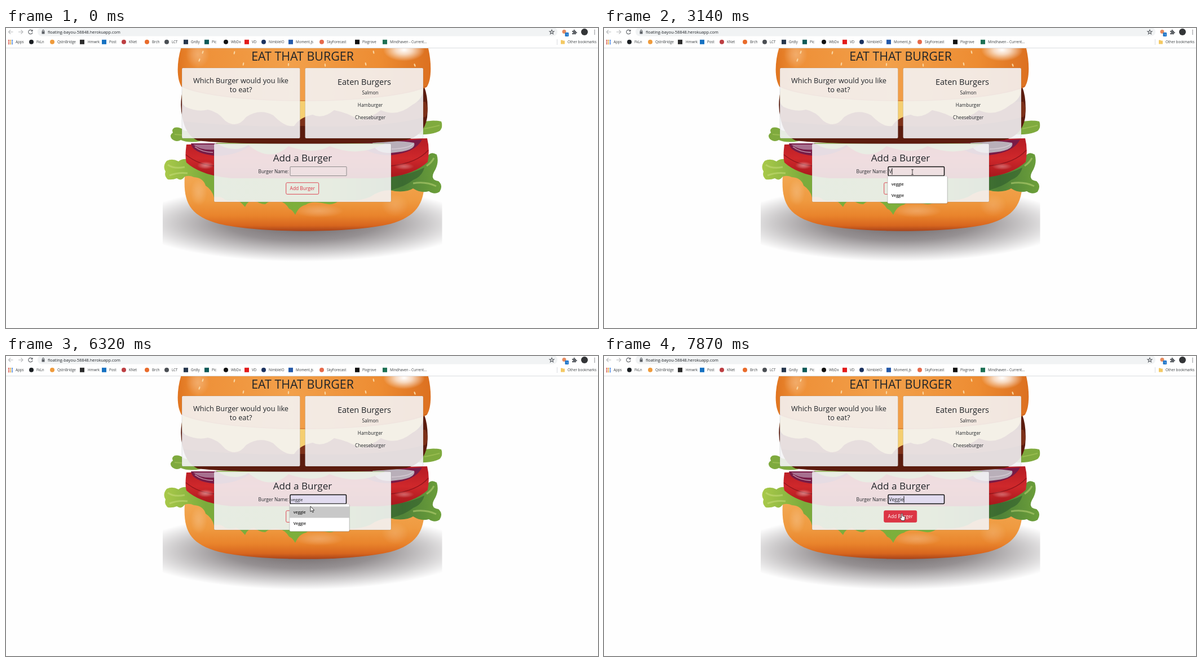
Recreate the animation shown at these times as an HTML page. Size 1050 by 533 pixels, loop 8 s.

```html
<!DOCTYPE html>
<html lang="en">
<head>
<meta charset="utf-8">
<title>Eat That Burger</title>
<style>
html, body { margin: 0; width: 100%; height: 100%; overflow: hidden; background: #fefefe; }
svg { display: block; width: 1050px; height: 533px; font-family: 'Open Sans', 'Noto Sans', sans-serif; }
text { fill: #212529; white-space: pre; }
.head { font-weight: 500; text-anchor: middle; }
.body { font-size: 8.25px; }
.mid { text-anchor: middle; }
.mark { font-size: 6.25px; fill: #3c4043; }
.item { font-size: 7.1px; font-weight: 600; fill: #222; }
.panel { fill: #f4f4f7; fill-opacity: .89; stroke: #000; stroke-opacity: .1; }
.icon { fill: none; stroke: #5f6368; stroke-width: 1.1; }
.cursor { fill: #fff; stroke: #111; stroke-width: .8; stroke-linejoin: round; }
</style>
</head>
<body>
<svg viewBox="0 0 1050 533">
<defs>
  <clipPath id="page"><path d="M278 36H773.5V533H278z"/></clipPath>
  <radialGradient id="shade">
    <stop offset="0" stop-color="#6b6466"/><stop offset=".45" stop-color="#959092"/>
    <stop offset=".75" stop-color="#cdcbcc"/><stop offset="1" stop-color="#fefefe"/>
  </radialGradient>
  <radialGradient id="glow">
    <stop offset="0" stop-color="#fff"/><stop offset=".4" stop-color="#fff" stop-opacity=".7"/>
    <stop offset="1" stop-color="#fff" stop-opacity="0"/>
  </radialGradient>
  <linearGradient id="crown">
    <stop offset="0" stop-color="#e0741f"/><stop offset=".08" stop-color="#ee9038"/>
    <stop offset=".45" stop-color="#f2a04a"/><stop offset=".8" stop-color="#ed8c32"/>
    <stop offset="1" stop-color="#dc7020"/>
  </linearGradient>
  <linearGradient id="heel" x2="0" y2="1">
    <stop offset="0" stop-color="#f2a752"/><stop offset=".45" stop-color="#ef9a40"/>
    <stop offset=".72" stop-color="#e9842c"/><stop offset=".9" stop-color="#d8661e"/>
    <stop offset="1" stop-color="#a8431a"/>
  </linearGradient>
  <linearGradient id="red" x2="0" y2="1">
    <stop offset="0" stop-color="#b51b24"/><stop offset=".5" stop-color="#cf282b"/>
    <stop offset="1" stop-color="#a5171c"/>
  </linearGradient>
  <linearGradient id="leaf">
    <stop offset="0" stop-color="#a9c94a"/><stop offset=".15" stop-color="#7bab3c"/>
    <stop offset=".6" stop-color="#7db03b"/><stop offset=".86" stop-color="#4f8238"/>
    <stop offset="1" stop-color="#6da03a"/>
  </linearGradient>
</defs>

<g clip-path="url(#page)">
  <ellipse cx="525" cy="347" rx="300" ry="68" fill="url(#shade)"/>
  <path fill="url(#heel)" d="M317 262C314 310 326 334 378 348C450 365 612 365 682 348C730 334 744 310 742 262z"/>
  <ellipse cx="555" cy="325" rx="44" ry="12" fill="url(#glow)" opacity=".22"/>
  <ellipse cx="342" cy="292" rx="15" ry="24" fill="url(#glow)" opacity=".18"/>
  <ellipse cx="690" cy="315" rx="24" ry="20" fill="url(#glow)" opacity=".15"/>

  <path fill="url(#leaf)" d="M322 233Q312 232 306 237Q295 231 285 236Q277 246 283 255Q280 263 287 269Q296 270 303 267Q311 273 317 264Q325 261 333 265Q350 266 354 280Q366 288 369 301Q382 298 388 305Q398 309 408 305Q416 308 424 318Q428 307 440 305Q452 314 460 313Q470 304 484 307Q496 310 502 321Q508 323 513 332Q520 316 532 314Q542 306 566 312Q580 316 592 306Q626 309 646 300Q670 284 690 290Q712 292 722 285Q736 294 750 290Q760 297 769 291Q776 280 767 272Q752 270 759 256Q769 240 764 225Q755 219 749 226L740 234z"/>
  <path fill="none" stroke="#cfe083" stroke-width="3" stroke-opacity=".45" d="M287 243Q298 251 317 247M290 262Q305 256 322 258M722 276Q744 272 763 281M746 245Q755 239 759 231"/>
  <path fill="#2d5a2d" fill-opacity=".55" d="M683 264Q715 261 742 248Q738 264 722 270Q709 281 683 288z"/>

  <path fill="url(#red)" d="M320 207Q317 229 320 239Q345 262 400 267H660Q720 264 748 238Q752 216 747 196z"/>
  <path fill="none" stroke="#7e0f17" stroke-width="1.5" stroke-opacity=".7" d="M319 225Q341 243 370 245M683 245Q729 240 749 217"/>
  <ellipse cx="354" cy="244" rx="15" ry="7" fill="url(#glow)" opacity=".4"/>
  <ellipse cx="706" cy="246" rx="18" ry="6" fill="url(#glow)" opacity=".3"/>
  <path fill="#781b46" d="M328 205Q330 222 370 227Q410 228 440 205zM620 205Q650 228 683 226Q727 221 738 198z"/>
  <path fill="#a7708f" d="M332 207Q345 218 370 216V207z"/>
  <path fill="#b9afb9" d="M650 204Q690 198 724 204Q729 218 683 222Q655 223 650 204z"/>
  <path fill="none" stroke="#e1d6df" stroke-width="1.5" stroke-opacity=".7" d="M335 211Q348 221 367 221M684 215Q714 214 722 206"/>

  <path fill="#7faa3e" d="M340 181Q328 185 316 182Q307 175 299 177Q293 180 296 186Q289 190 294 197Q302 204 310 199Q324 205 345 201z"/>
  <path fill="#7faa3e" d="M736 168Q754 162 772 166Q776 176 769 183Q756 190 730 189z"/>
  <path fill="none" stroke="#a8c75c" stroke-width="2" stroke-opacity=".6" d="M299 189Q319 190 338 195M742 179Q757 176 769 173"/>
  <path fill="#91b84e" d="M372 204Q403 224 430 208Q469 240 501 210Q545 226 574 210Q626 231 672 205z"/>
  <path fill="#5c1c0e" d="M314 108Q307 136 313 159Q318 190 340 200Q390 206 525 206Q660 206 710 199Q742 191 747 159Q750 126 742 105z"/>
  <path fill="#7d3018" d="M314 140Q309 151 316 166Q420 177 525 174Q668 179 744 158Q751 147 744 131z"/>
  <path fill="#f5ce70" d="M314 106Q308 133 318 140Q340 150 358 145Q375 148 389 165Q410 180 426 158Q450 142 474 155Q495 177 511 174Q522 158 544 154Q561 163 582 146Q608 151 627 164Q650 158 665 146Q693 159 720 137Q742 125 740 105z"/>
  <path fill="url(#crown)" d="M313 28C302 57 302 92 312 105C382 138 674 138 746 105C756 91 755 57 747 28z"/>
  <path fill="none" stroke="#bd571a" stroke-width="1.5" stroke-opacity=".5" d="M311 103C382 138 674 138 747 103"/>
  <ellipse cx="706" cy="39" rx="37" ry="20" fill="url(#glow)"/>
  <ellipse cx="340" cy="47" rx="21" ry="24" fill="url(#glow)" opacity=".25"/>
  <g id="seeds" fill="#f9d5a0"></g>
</g>

<rect class="panel" x="312" y="71" width="209.5" height="125" rx="2"/>
<rect class="panel" x="530.5" y="71" width="209.5" height="125" rx="2"/>
<rect class="panel" x="369" y="205.5" width="314" height="103.5" rx="2"/>

<text class="head" x="526" y="57.6" font-size="21.4">EAT THAT BURGER</text>
<text class="head" x="416.5" y="98" font-size="12.75">Which Burger would you like</text>
<text class="head" x="416.5" y="113.5" font-size="12.75">to eat?</text>
<text class="head" x="635.5" y="100.5" font-size="14.5">Eaten Burgers</text>
<text class="body mid" x="646" y="117.6">Salmon</text>
<text class="body mid" x="646" y="139.6">Hamburger</text>
<text class="body mid" x="646" y="161.6">Cheeseburger</text>
<text class="head" x="526" y="237" font-size="17.1">Add a Burger</text>
<text class="body" x="447.6" y="258">Burger Name:</text>
<rect id="field" x="504" y="246.5" width="100" height="16"/>
<text id="value" x="505.5" y="258"></text>
<path id="caret" stroke="#111"/>
<rect id="button" x="496.7" y="274.8" width="58" height="20.5" rx="2" fill="#dc3545" stroke="#dc3545" stroke-width=".9"/>
<text id="label" class="mid" x="525.8" y="288.4" font-size="8.4">Add Burger</text>

<g id="menu">
  <rect id="menuShadow" x="502.5" y="264" width="107.5" rx="2" fill="#000" fill-opacity=".12"/>
  <rect id="menuBox" x="503" y="263" width="106" rx="2" fill="#fff" stroke="#bbb" stroke-width=".6"/>
  <rect id="hover" x="503" width="106" height="20" fill="#c8c8c8"/>
  <g id="items"></g>
</g>

<path fill="#fff" d="M0 0H1050V35H0z"/>
<path stroke="#dadce0" d="M0 35.5H1050M977.5 20V30"/>
<rect x="56" y="-1" width="922" height="15.5" rx="7.5" fill="#f1f3f4"/>
<path class="icon" stroke-opacity=".45" d="M12.5 7H4.5M8 3.5L4.5 7L8 10.5M22 7H30M26.5 3.5L30 7L26.5 10.5"/>
<path class="icon" d="M46.5 5A3.7 3.7 0 1 0 47 8M47 3V5.8H44.2"/>
<path fill="#5f6368" d="M63.5 6H68.5V10.5H63.5z"/>
<path class="icon" stroke-width=".9" d="M64.5 6V4.7Q66 2 67.5 4.7V6"/>
<text x="74" y="9.8" font-size="7.35">floating-bayou-58848.herokuapp.com</text>
<path class="icon" stroke-width=".9" d="M968 3.2L969.1 6H972L969.7 7.8L970.6 10.7L968 9L965.4 10.7L966.3 7.8L964 6H966.9z"/>
<circle cx="990" cy="6.5" r="3.5" fill="#e48b61"/>
<rect x="991.5" y="8" width="6.5" height="7" rx="1" fill="#1a73c8"/>
<text x="993.5" y="13.6" font-size="5.5" style="fill:#fff">1</text>
<path fill="#5f6368" d="M1004 5H1006.5Q1006 2.8 1007.8 2.8Q1009.5 2.8 1009 5H1011V7Q1013 6.7 1013 8.2Q1013 9.6 1011 9.3V11.3H1004V9Q1006 9.4 1006 8Q1006 6.8 1004 7z"/>
<circle cx="1026" cy="7" r="6" fill="#333537"/>
<path stroke="#5f6368" stroke-width="1.7" stroke-linecap="round" stroke-dasharray="0 3.2" d="M1044 4V11"/>
<g id="marks"></g>
<path fill="#f4c963" d="M984 21.5H987L988 22.5H991V28.5H984z"/>
<text class="mark" x="996" y="27">Other bookmarks</text>

<circle id="click" cx="547" cy="256" r="6" fill="#ffe83b" fill-opacity=".8"/>
<g class="cursor">
  <path id="arrow" d="M0 0V9.6L2.3 7.6L3.9 11L5.4 10.3L3.9 7.1H6.8z"/>
  <path id="beam" fill="none" d="M-1.8 -4.3H1.8M0 -4.3V4.3M-1.8 4.3H1.8"/>
  <path id="hand" d="M-1.2 1Q0 -.6 1.1 1V5L4.5 5.8Q5.8 6.2 5.5 8L4.5 13H-.5L-3.9 8.4Q-3.8 6.7 -1.2 8.5z"/>
</g>
</svg>

<script>
const $ = id => document.getElementById(id);
const set = (id, attrs) => { for (const k in attrs) $(id).setAttribute(k, attrs[k]); };
const show = (id, on) => { $(id).style.display = on ? '' : 'none'; };

// icon centre, label start, colour, round icon, label
const marks = [
  [45, 54, '#1b1f23', 1, 'FkLn'], [82, 91, '#ef9b3c', 1, 'QstnBridge'],
  [135, 145, '#2c2c2c', 0, 'Hmwrk'], [174, 183, '#1671c2', 0, 'Post'],
  [209, 218, '#bd3f43', 1, 'KNet'], [250, 259, '#e96b2b', 1, 'Brch'],
  [285, 294, '#4b4f54', 1, 'LCT'], [319, 328, '#26374d', 0, 'Grdly'],
  [356, 365, '#0d5a58', 0, 'Pic'], [390, 399, '#111', 1, 'WbDx'],
  [427, 436, '#e21b1b', 0, 'VD'], [457, 466, '#1c3360', 1, 'NimbleIO'],
  [505, 514, '#2459a9', 0, 'Moment.js'], [560, 569, '#e66a4b', 1, 'SkyForecast'],
  [623, 632, '#111', 0, 'Pixgrove'], [672, 681, '#1d7054', 0, 'Mindhaven - Current...']
];
const gridColors = ['#d94b3c', '#e2a02f', '#3b7de0'];
let bar = '<text class="mark" x="17" y="27">Apps</text>';
for (let i = 0; i < 9; i++)
  bar += `<rect x="${4 + i % 3 * 3}" y="${21 + (i / 3 | 0) * 3}" width="2" height="2" fill="${gridColors[i % 3]}"/>`;
for (const [cx, x, color, round, name] of marks)
  bar += `<rect x="${cx - 4}" y="20.8" width="8" height="8" rx="${round ? 4 : 0}" fill="${color}"/>
    <text class="mark" x="${x}" y="27">${name}</text>`;
$('marks').innerHTML = bar;

$('seeds').innerHTML = [[349, 43], [343, 57], [405, 44], [421, 64], [501, 65], [566, 66], [638, 64], [652, 43], [725, 66]]
  .map(([x, y]) => `<ellipse cx="${x}" cy="${y}" rx="1.2" ry="3" transform="rotate(${(525 - x) / 10} ${x} ${y})"/>`).join('');

const saved = ['Salmon', 'Duncan', 'js', 'Duncan Holbeck', 'thing', 'dholbeck'];
const matches = ['veggie', 'Veggie'];
const typed = [3140, 3460, 4090, 4240, 4390, 4560];
const caretOff = [[2300, 2850], [4010, 4090], [5110, 5590], [6150, 7020], [7560, 7730]];
const path = [
  [220, 1000, 515], [750, 628, 312], [1209, 628, 312], [1210, 615, 289],
  [1600, 547, 256], [6319, 547, 256], [6320, 540, 267], [6850, 538, 294],
  [7019, 538, 294], [7020, 537, 294.5], [7399, 537, 294.5], [7400, 535, 290],
  [7560, 530, 278], [7729, 530, 278], [7870, 528.5, 279.5]
];

// The pointer advances in steps of about 75 ms.
function pointer(t) {
  let i = path.length - 1;
  while (i && path[i][0] > t) i--;
  const a = path[i], b = path[i + 1];
  if (!b) return [a[1], a[2]];
  const p = Math.floor((t - a[0]) / 75) * 75 / (b[0] - a[0]);
  return [a[1] + (b[1] - a[1]) * p, a[2] + (b[2] - a[2]) * p];
}

let shownItems;
function fillMenu(items) {
  if (items === shownItems) return;
  shownItems = items;
  const height = 8.7 + 19.9 * items.length;
  set('menuBox', { height });
  set('menuShadow', { height });
  $('items').innerHTML = items.map((s, i) =>
    `<text class="item" x="509.8" y="${280.4 + 19.9 * i}">${s}</text>`).join('');
}

function draw(t) {
  const [x, y] = pointer(t);
  const focused = t >= 1770, preview = t >= 6320 && t < 7020;
  const row = y < 287 ? 0 : 1;

  const kind = t < 220 ? '' : t >= 7020 ? 'hand' : t < 6320 && x < 604 && y < 263 ? 'beam' : 'arrow';
  for (const id of ['arrow', 'beam', 'hand']) {
    show(id, id === kind);
    set(id, { transform: `translate(${x} ${y})` });
  }
  show('click', t >= 1770 && t < 1900);

  set('field', {
    fill: t >= 6320 ? '#e2dcf0' : '#fff', 'fill-opacity': t >= 6320 ? 1 : .1,
    stroke: focused ? '#101010' : '#767676', 'stroke-width': focused ? 1.5 : .8,
    rx: focused ? 1.5 : .5, width: focused ? 99.5 : 100
  });
  const value = $('value');
  value.textContent = preview ? matches[row] : 'Veggie'.slice(0, typed.filter(k => k <= t).length);
  set('value', { 'font-size': preview ? 7.1 : 8.6 });
  const cx = value.textContent ? 505.8 + value.getComputedTextLength() : 506.5;
  set('caret', { d: `M${cx} 249V260.5` });
  show('caret', focused && !caretOff.some(([a, b]) => t >= a && t < b));

  show('menu', t >= 1840 && t < 7020);
  fillMenu(t < 3140 ? saved : matches);
  show('hover', preview);
  set('hover', { y: 267.5 + 19.9 * row });

  const heat = Math.min(1, Math.max(0, (t - 7020) / 150));
  const mix = (a, b) => Math.round(a + (b - a) * heat);
  set('button', { 'fill-opacity': heat });
  $('label').style.fill = `rgb(${mix(220, 255)},${mix(53, 255)},${mix(69, 255)})`;
}

const start = performance.now();
function tick() {
  draw((performance.now() - start) % 8000);
  requestAnimationFrame(tick);
}
tick();
</script>
</body>
</html>
```
